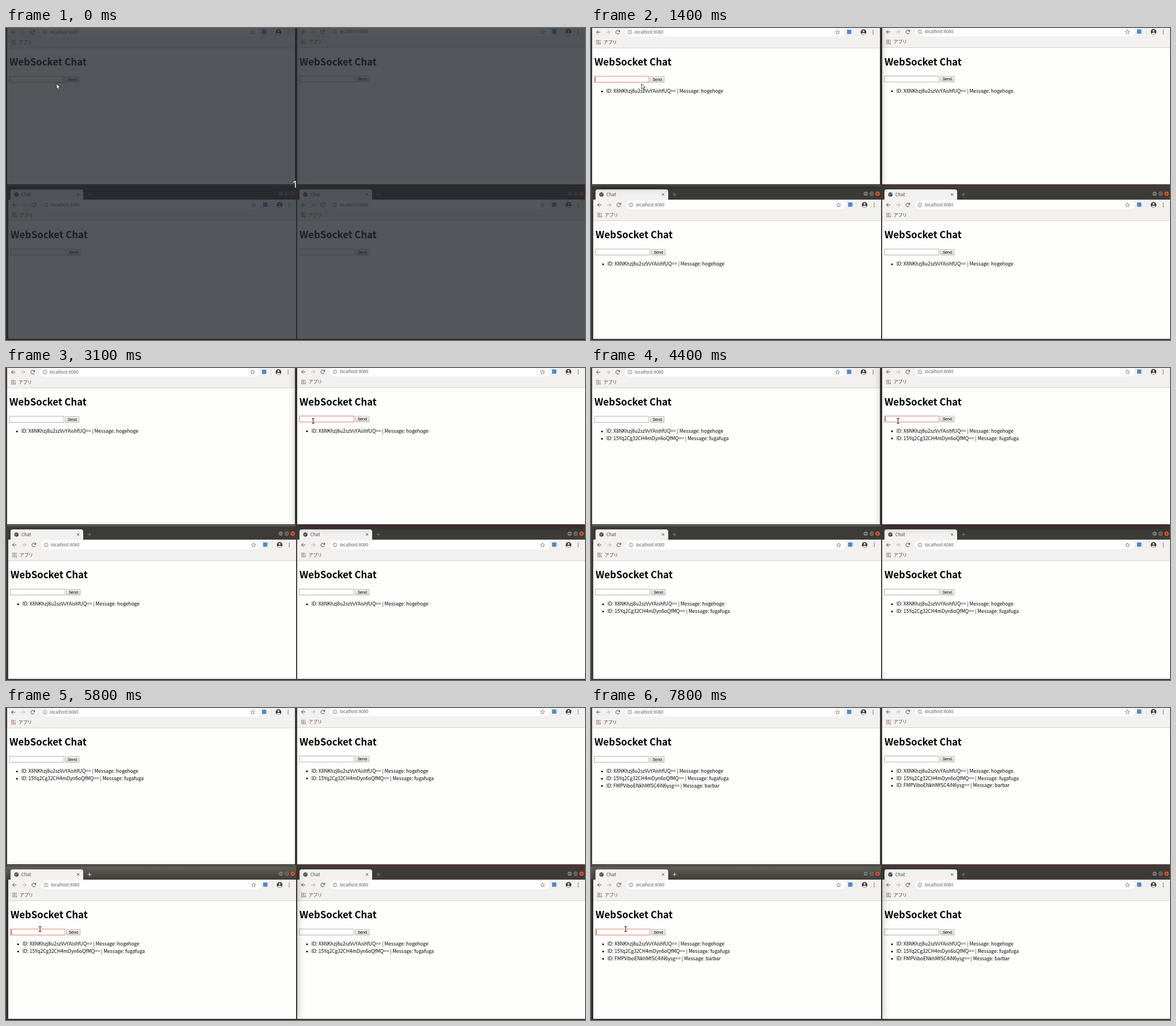
Write an HTML page with a canvas that moves like this. It is 1020 by 549 pixels and loops after 8 s.

```html
<!DOCTYPE html>
<html lang="ja">
<head>
<meta charset="utf-8">
<title>WebSocket Chat</title>
<style>
html, body { margin: 0; width: 100%; height: 100%; overflow: hidden; background: #3c3b37; }
canvas { display: block; }
</style>
</head>
<body>
<canvas id="stage" width="1020" height="549"></canvas>
<script>
const ctx = document.getElementById('stage').getContext('2d');
const LOOP = 8000;
const CJK = '"Noto Sans CJK JP", "Noto Sans CJK", "Noto Sans", sans-serif';
const ARIAL = '"Liberation Sans", Arial, sans-serif';
const DARK = '#3c3b37', CHROME = '#f2f1ef', PAGE = '#fefefd', ICON = '#4f5053';

const windows = [
  { x: 2, y: 0, bottom: 275 },
  { x: 513, y: -0.5, bottom: 275 },
  { x: 4, y: 304, bottom: 547, tab: true },
  { x: 513, y: 304, bottom: 547, tab: true }
];

// One message per focused window: key press times, then the moment it is sent.
const messages = [
  { win: 0, id: 'X8NKhzj8u2szVvYAishfUQ==', text: 'hogehoge', sent: 1400,
    keys: [500, 600, 600, 700, 900, 1000, 1000, 1200] },
  { win: 1, id: '15Yq2Cg32CH4mDyn6oQfMQ==', text: 'fugafuga', sent: 4400,
    keys: [3400, 3500, 3600, 3700, 3800, 4000, 4200, 4300] },
  { win: 2, id: 'FMPViboENkhMfSC4iN6ysg==', text: 'barbar', sent: 7700,
    keys: [6200, 6300, 6500, 6700, 6900, 7000] }
];

const caretOff = [[0, 500], [1900, 2500], [3100, 3400], [4900, 5800]];

const mousePath = [
  [0, 89, 98], [1800, 89, 98], [1900, 160, 104], [2000, 330, 110], [2100, 473, 110],
  [2200, 473, 110], [2300, 518, 101], [2400, 538, 94], [2500, 541, 93],
  [4800, 541, 93], [5700, 60, 389], [5900, 60, 389], [6000, 61, 389]
];

const focusAt = t => t < 2500 ? 0 : t < 5800 ? 1 : 2;

function mouseAt(t) {
  const i = mousePath.findIndex(p => p[0] > t);
  if (i < 0) return mousePath[mousePath.length - 1].slice(1);
  const [t0, x0, y0] = mousePath[i - 1], [t1, x1, y1] = mousePath[i];
  const u = (t - t0) / (t1 - t0), k = u * u * (3 - 2 * u);
  return [x0 + (x1 - x0) * k, y0 + (y1 - y0) * k];
}

function rect(x, y, w, h, fill) {
  ctx.fillStyle = fill;
  ctx.fillRect(x, y, w, h);
}

function round(x, y, w, h, r, fill) {
  ctx.beginPath();
  ctx.roundRect(x, y, w, h, r);
  ctx.fillStyle = fill;
  ctx.fill();
}

function dot(x, y, r, fill) {
  ctx.beginPath();
  ctx.arc(x, y, r, 0, 7);
  ctx.fillStyle = fill;
  ctx.fill();
}

function ring(x, y, r, color, width = 0.8, from = 0, to = 7) {
  ctx.beginPath();
  ctx.arc(x, y, r, from, to);
  ctx.strokeStyle = color;
  ctx.lineWidth = width;
  ctx.stroke();
}

function line(points, color, width = 1) {
  ctx.beginPath();
  points.forEach(([x, y]) => ctx.lineTo(x, y));
  ctx.strokeStyle = color;
  ctx.lineWidth = width;
  ctx.stroke();
}

function text(str, x, y, size, family = CJK, color = '#000', weight = 400) {
  ctx.font = `${weight} ${size}px ${family}`;
  ctx.fillStyle = color;
  ctx.fillText(str, x, y);
}

function vertical(y0, y1, top, bottom) {
  const g = ctx.createLinearGradient(0, y0, 0, y1);
  g.addColorStop(0, top);
  g.addColorStop(1, bottom);
  return g;
}

function drawArrowIcon(x, y, dir, color) {
  line([[x - 3.5 * dir, y], [x + 3.5 * dir, y]], color);
  line([[x, y - 3.5], [x + 3.5 * dir, y], [x, y + 3.5]], color);
}

function drawStar(x, y) {
  const points = [];
  for (let i = 0; i <= 10; i++) {
    const a = i * Math.PI / 5 - Math.PI / 2, r = i % 2 ? 1.8 : 4;
    points.push([x + r * Math.cos(a), y + r * Math.sin(a)]);
  }
  line(points, '#66676a', 0.75);
}

function drawTitleBar(focused) {
  rect(-4, -25, 511, 23, focused ? vertical(-25, -2, '#605f58', '#3f3e39') : DARK);
  round(4, -20, 128, 18.5, [4, 4, 0, 0], CHROME);
  dot(14.5, -11, 3.8, '#3f4145');
  line([[12, -12.5], [14, -11], [13.5, -8.8]], '#d8d8d6', 1);
  line([[15.5, -14], [16, -12], [17.5, -11.2]], '#d8d8d6', 0.9);
  text('Chat', 23, -8.3, 7.9, CJK, '#45464a');
  line([[121, -13.2], [125.2, -9]], '#3f4145', 0.9);
  line([[125.2, -13.2], [121, -9]], '#3f4145', 0.9);
  const plus = focused ? '#e8e7e2' : '#7d7c77';
  line([[140, -11], [146.4, -11]], plus);
  line([[143.2, -14.2], [143.2, -7.8]], plus);
  [480, 490.5, 501].forEach((x, i) => {
    dot(x, -12.5, 4.2, i === 2 ? '#e8552f' : '#7c7b74');
    ring(x, -12.5, 4.2, '#33322e', 0.6);
    if (i === 0) line([[x - 2, -12.5], [x + 2, -12.5]], '#3a3935', 0.9);
    if (i === 1) {
      ctx.lineWidth = 0.8;
      ctx.strokeRect(x - 1.6, -14.1, 3.2, 3.2);
    }
    if (i === 2) {
      line([[x - 1.6, -14.1], [x + 1.6, -10.9]], '#4c2015', 0.9);
      line([[x + 1.6, -14.1], [x - 1.6, -10.9]], '#4c2015', 0.9);
    }
  });
}

function drawToolbar() {
  rect(0, -2, 507, 37, CHROME);
  round(58, -0.8, 387, 15.8, 7.9, '#fff');
  drawArrowIcon(11, 7.3, -1, ICON);
  drawArrowIcon(28, 7.3, 1, '#b2b2b0');
  ring(45, 7.3, 3.3, ICON, 1, 0.4, 5.5);
  ctx.beginPath();
  ctx.moveTo(49, 3.2);
  ctx.lineTo(49, 6.8);
  ctx.lineTo(45.4, 6.8);
  ctx.fillStyle = ICON;
  ctx.fill();
  ring(66.5, 7.3, 3.4, '#66676a', 0.8);
  rect(66.1, 6.8, 0.8, 2.4, '#66676a');
  rect(66.1, 5.2, 0.8, 0.9, '#66676a');
  text('localhost:8080', 75, 9.9, 7.42, CJK, '#55575a');
  drawStar(432.3, 7.5);
  rect(449, 3, 7.5, 7.5, '#4a8ad4');
  rect(465, 2, 0.7, 11, '#dddcda');

  dot(478, 7.3, 5, '#3f4145');
  dot(478, 5.6, 1.6, CHROME);
  ctx.beginPath();
  ctx.ellipse(478, 10, 3.1, 1.6, 0, 0, 7);
  ctx.fillStyle = CHROME;
  ctx.fill();
  for (let i = -1; i <= 1; i++) dot(495, 7.3 + i * 3, 0.85, ICON);

  const colors = ['#d8504a', '#d8504a', '#e0a63c', '#4f9b62', '#4a7fc8', '#e0a63c', '#4f9b62', '#4a7fc8', '#d8504a'];
  colors.forEach((c, i) => rect(7.4 + i % 3 * 2.9, 21.2 + Math.floor(i / 3) * 2.9, 1.9, 1.9, c));
  text('アプリ', 20, 27.6, 7.9, CJK, '#45464a');
  rect(0, 34.6, 507, 0.9, '#cfcecb');
}

function drawForm(index, t, focused) {
  ctx.lineWidth = 1;
  ctx.fillStyle = '#fff';
  ctx.fillRect(4, 85, 96, 10.5);
  ctx.strokeStyle = focused ? '#db806a' : '#b0b0ae';
  ctx.strokeRect(4, 85, 96, 10.5);

  if (focused) {
    const msg = messages.find(m => m.win === index);
    const count = t < msg.sent ? msg.keys.filter(k => k <= t).length : 0;
    const typed = msg.text.slice(0, count);
    text(typed, 5.6, 92.6, 7.05, ARIAL);
    if (!caretOff.some(([a, b]) => t >= a && t < b))
      rect(5.4 + ctx.measureText(typed).width, 86, 0.8, 8.5, '#222');
  }

  round(102.3, 85, 25, 10.8, 1, '#a3a3a1');
  round(103, 85.7, 23.6, 9.4, 0.5, vertical(85, 95, '#f7f7f6', '#dcdcda'));
  text('Send', 106.4, 92.8, 7.05, ARIAL);
}

function drawWindow(index, t) {
  const win = windows[index], focused = focusAt(t) === index;
  const top = win.tab ? -25 : -5, height = win.bottom - win.y;
  ctx.save();
  ctx.translate(win.x, win.y);
  if (focused) {
    ctx.shadowColor = 'rgba(0,0,0,.4)';
    ctx.shadowBlur = 14;
    ctx.shadowOffsetY = 3;
  }
  rect(0, top, 507, height - top, PAGE);
  ctx.shadowColor = 'transparent';
  if (win.tab) drawTitleBar(focused);
  drawToolbar();
  text('WebSocket Chat', 4, 66, 17, CJK, '#000', 700);
  drawForm(index, t, focused);
  messages.filter(m => t >= m.sent).forEach((m, i) => {
    const y = 114.3 + i * 12.75;
    dot(17.3, y - 2.6, 1.5, '#000');
    text(`ID: ${m.id} | Message: ${m.text}`, 25, y, 8.5);
  });
  ctx.restore();
}

function drawMouse(t) {
  const [x, y] = mouseAt(t);
  const overInput = windows.some(w =>
    x > w.x + 3 && x < w.x + 100 && y > w.y + 84 && y < w.y + 96);
  ctx.save();
  ctx.translate(x, y);
  if (overInput) {
    for (const [color, width] of [['#fff', 2], ['#222', 1.1]]) {
      line([[-2.3, -4.2], [2.3, -4.2]], color, width);
      line([[-2.3, 4.2], [2.3, 4.2]], color, width);
      line([[0, -4.2], [0, 4.2]], color, width);
    }
  } else {
    ctx.beginPath();
    [[0, 0], [0, 9.3], [2.1, 7.4], [3.5, 10.5], [5, 9.8], [3.7, 6.8], [6.4, 6.6]]
      .forEach(([px, py]) => ctx.lineTo(px, py));
    ctx.closePath();
    ctx.fillStyle = '#fff';
    ctx.fill();
    ctx.strokeStyle = '#2b2b2b';
    ctx.lineWidth = 0.9;
    ctx.stroke();
  }
  ctx.restore();
}

function draw(t) {
  rect(0, 0, 1020, 549, DARK);
  rect(2, 277, 509, 1, '#85847e');
  rect(512, 277.5, 508, 1, '#8a2635');
  const focus = focusAt(t);
  [0, 1, 2, 3].filter(i => i !== focus).concat(focus).forEach(i => drawWindow(i, t));
  if (t < 400) {
    rect(0, 0, 1020, 549, 'rgba(35,39,46,.78)');
    ctx.textAlign = 'center';
    text('1', 509.3, 280.5, 17, '"Noto Sans", sans-serif', '#fff');
    ctx.textAlign = 'left';
  }
  drawMouse(t);
}

const start = performance.now();
function tick() {
  const t = (performance.now() - start) % LOOP;
  draw(Math.floor(t / 100) * 100);
  requestAnimationFrame(tick);
}
tick();
</script>
</body>
</html>
```
